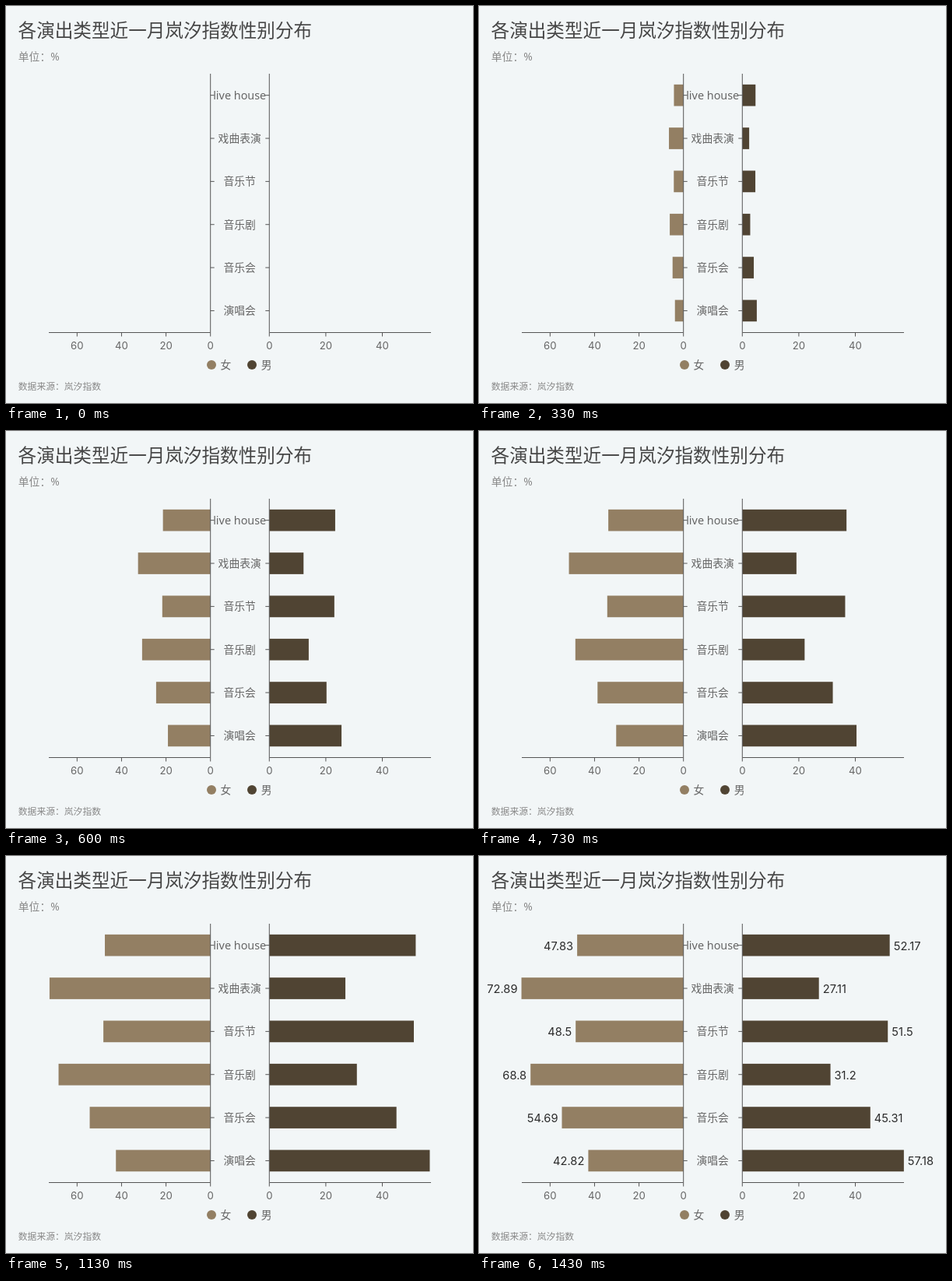
An HTML page for the animation above (2.51 s loop, 600 by 510 pixels).

```html
<!DOCTYPE html>
<html lang="zh-CN">
<head>
<meta charset="utf-8">
<style>
  html, body { margin: 0; width: 100%; height: 100%; overflow: hidden; background: #f2f6f7; }
  svg { display: block; width: 600px; height: 510px; }
  text { font-family: 'Noto Sans', 'Noto Sans CJK SC', 'Noto Sans CJK', sans-serif; font-size: 13.8px; fill: #666; }
  .title { font-size: 23.6px; fill: #464646; }
  .unit { fill: #888; }
  .note { font-size: 11.8px; fill: #888; }
  .mid { text-anchor: middle; }
  .latin { font-size: 14.4px; }
  .num { font-family: Inter, 'Noto Sans', sans-serif; font-size: 13.2px; text-anchor: middle; }
  .value { font-family: Inter, 'Noto Sans', sans-serif; font-size: 14.7px; fill: #2b2b2b; }
  .women { fill: #937f63; }
  .men { fill: #504433; }
  #axes { stroke: #555; stroke-width: 1; fill: none; }
</style>
</head>
<body>
<svg viewBox="0 0 600 510">
  <text class="title" x="15.6" y="40.4">各演出类型近一月岚汐指数性别分布</text>
  <text class="unit" x="15.8" y="70">单位：%</text>
  <g id="bars"></g>
  <path id="axes"/>
  <g id="labels"></g>
  <g id="values" opacity="0"></g>
  <circle class="women" cx="264" cy="461" r="6"/>
  <text x="275.6" y="466">女</text>
  <circle class="men" cx="316" cy="461" r="6"/>
  <text x="327.8" y="466">男</text>
  <text class="note" x="15.8" y="493.3">数据来源：岚汐指数</text>
</svg>
<script>
const LOOP = 2510, FRAME = 100 / 3;
const GROW_START = -43, GROW_TIME = 1335, FADE_START = 1292, FADE_TIME = 138;
const TOP = 87, BAND = 55.35, BAR = 27.7, BASE = 419.5;

const rows = [
  ['live house', 47.83, 52.17],
  ['戏曲表演', 72.89, 27.11],
  ['音乐节', 48.5, 51.5],
  ['音乐剧', 68.8, 31.2],
  ['音乐会', 54.69, 45.31],
  ['演唱会', 42.82, 57.18]
];
const sides = [
  { name: 'women', x: 262.7, dir: -1, scale: 2.856, ticks: [0, 20, 40, 60], end: 55 },
  { name: 'men', x: 338.3, dir: 1, scale: 3.63, ticks: [0, 20, 40], end: 546 }
];

const $ = id => document.getElementById(id);

function add(parent, tag, attrs, text) {
  const el = document.createElementNS('http://www.w3.org/2000/svg', tag);
  for (const key in attrs) el.setAttribute(key, attrs[key]);
  if (text !== undefined) el.textContent = text;
  parent.appendChild(el);
  return el;
}

const bars = [];
let axes = '';

for (const side of sides) {
  axes += `M${side.x} ${TOP}V${BASE}M${side.x} ${BASE}H${side.end}`;
  for (const n of side.ticks) {
    const x = side.x + side.dir * n * side.scale;
    axes += `M${x} ${BASE}v5`;
    add($('labels'), 'text', { class: 'num', x, y: 441.2 }, n);
  }
}

rows.forEach((row, i) => {
  const cy = TOP + BAND * (i + 0.5);
  const latin = /^[a-z]/.test(row[0]);
  add($('labels'), 'text', { class: latin ? 'mid latin' : 'mid', x: 300.2, y: cy + 5 }, row[0]);
  sides.forEach((side, s) => {
    const value = row[s + 1], full = value * side.scale;
    axes += `M${side.x} ${cy}h${-5 * side.dir}`;
    const el = add($('bars'), 'rect', { class: side.name, x: side.x, y: cy - BAR / 2, width: 0, height: BAR });
    bars.push({ el, side, full });
    add($('values'), 'text', {
      class: 'value',
      x: side.x + side.dir * (full + 5),
      y: cy + 6,
      'text-anchor': side.dir < 0 ? 'end' : 'start'
    }, value);
  });
});
$('axes').setAttribute('d', axes);

const clamp = v => Math.max(0, Math.min(1, v));
const easeInOut = k => k < 0.5 ? 4 * k ** 3 : 1 - 4 * (1 - k) ** 3;

function draw(time) {
  // advance in 30 fps steps
  const step = Math.floor((time % LOOP + 4) / FRAME);
  const t = step * FRAME;
  const grown = step ? easeInOut(clamp((t - GROW_START) / GROW_TIME)) : 0;
  for (const { el, side, full } of bars) {
    const w = full * grown;
    el.setAttribute('width', w);
    if (side.dir < 0) el.setAttribute('x', side.x - w);
  }
  $('values').setAttribute('opacity', clamp((t - FADE_START) / FADE_TIME));
}

const start = performance.now();
function tick() {
  draw(performance.now() - start);
  requestAnimationFrame(tick);
}
tick();
</script>
</body>
</html>
```
